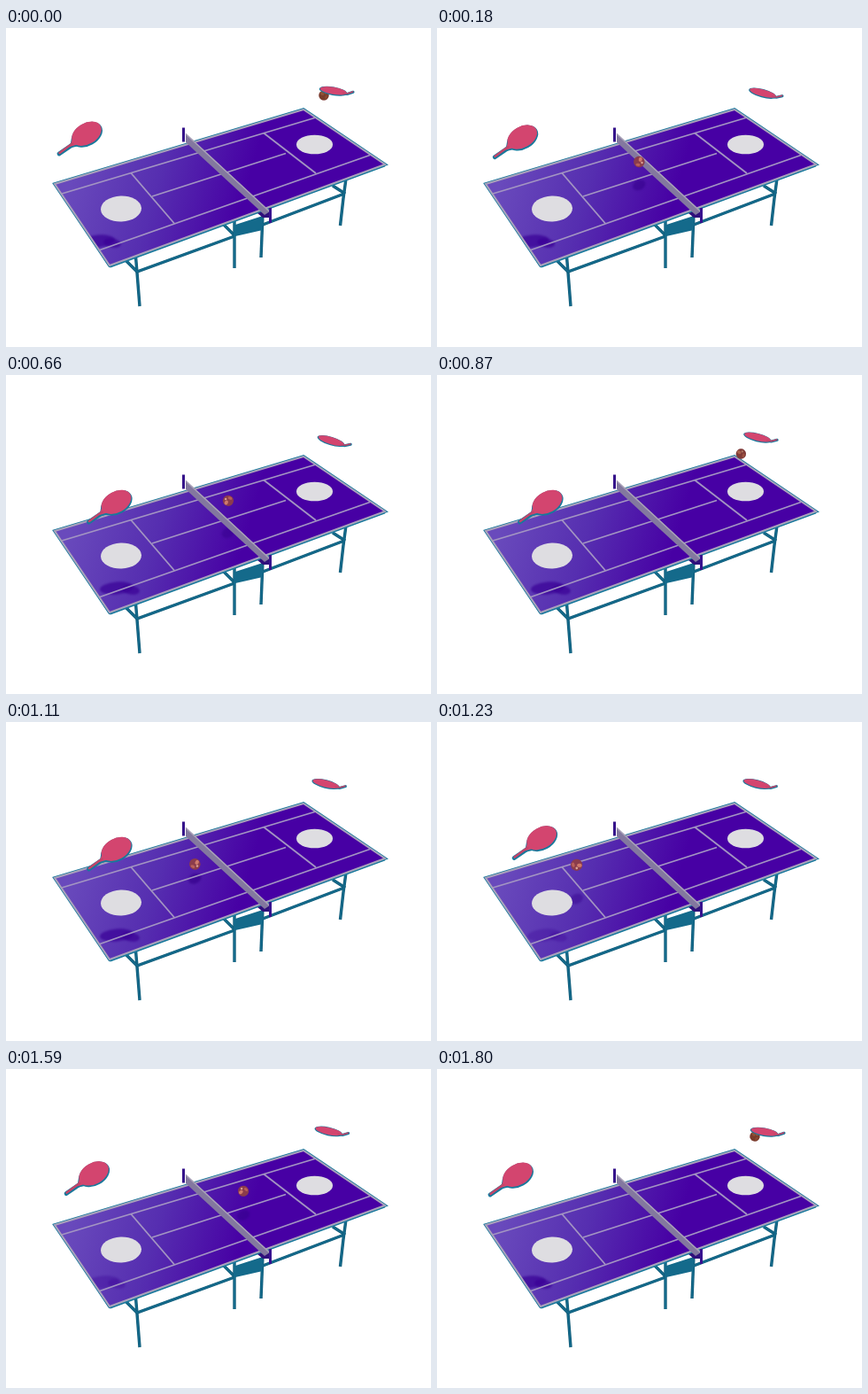
These frames come from a looping animation (480x360 px, 1830 ms). An HTML page with a canvas:

```html
<!DOCTYPE html>
<html lang="en">
<head>
<meta charset="utf-8">
<title>Table tennis rally</title>
<style>
html, body { margin: 0; width: 100%; height: 100%; overflow: hidden; background: #fff; }
canvas { display: block; width: 480px; height: 360px; }
</style>
</head>
<body>
<canvas id="stage" width="480" height="360"></canvas>
<script>
const ctx = document.getElementById('stage').getContext('2d');
const LOOP = 1830, STEP = 30, FLIGHT = 450;
const TEAL = '#146a8b', DARK_TEAL = '#115b78', RIM = '#17799c';
const PINK = '#d3456f', GRIP = '#c44468';
const TOP = [[55, 176], [336, 92], [428, 154], [117, 268]];

// where each flight starts, and where it meets the table
const HITS = [[359, 76], [120, 147], [350, 74], [114, 129]];
const BOUNCES = [[176, 197], [322, 146], [186, 187], [322, 146]];

// paddle poses: x, y, tilt
const LEFT = { ready: [91, 119.5, -30], low: [124.5, 143.5, -29], high: [110.5, 116, -30] };
const RIGHT = { swing: [369.5, 71, 8], rest: [367, 74.3, 15], high: [361, 69.8, 12] };

const lerp = (a, b, s) => a + (b - a) * s;
const mix = (a, b, s) => a.map((v, i) => lerp(v, b[i], s));
const clamp = s => Math.min(1, Math.max(0, s));
const rad = deg => deg * Math.PI / 180;

function ease(t, from, to) {
  const s = clamp((t - from) / (to - from));
  return s * s * (3 - 2 * s);
}

function leftPose(t) {
  let p = mix(LEFT.ready, LEFT.low, ease(t, 90, 450));
  p = mix(p, LEFT.high, ease(t, 1110, 1365));
  return mix(p, LEFT.ready, ease(t, 1365, 1770));
}

function rightPose(t) {
  let p = mix(RIGHT.swing, RIGHT.rest, ease(t, 0, 270));
  p = mix(p, RIGHT.high, ease(t, 660, 930));
  return mix(p, RIGHT.swing, ease(t, 1440, 1800));
}

function ballAt(t) {
  const n = Math.floor(t / FLIGHT) % 4;
  const s = t % FLIGHT / FLIGHT;
  const leftward = n % 2 === 0;
  const split = leftward ? .56 : .72;
  const [near, far] = leftward ? [52, 90] : [90, 52];
  const falling = s < split;
  const k = falling ? s / split : (s - split) / (1 - split);
  const lift = falling ? (leftward ? 14 : 5) : 3;
  const a = [...HITS[n], HITS[n][1] + near];
  const b = [...BOUNCES[n], BOUNCES[n][1]];
  const end = HITS[(n + 1) % 4];
  const c = [...end, end[1] + far];
  const [x, y, ground] = falling ? mix(a, b, k) : mix(b, c, k);
  return {
    x, ground,
    y: y - 4 * lift * k * (1 - k),
    r: lerp(6.8, 5.6, (x - 114) / 245),
    shade: clamp(1 - Math.min(s, 1 - s) * 6)
  };
}

function trace(points, close) {
  ctx.beginPath();
  points.forEach(p => ctx.lineTo(p[0], p[1]));
  if (close) ctx.closePath();
}

function poly(points, color) {
  trace(points, true);
  ctx.fillStyle = color;
  ctx.fill();
}

function line(color, width, ...points) {
  trace(points);
  ctx.strokeStyle = color;
  ctx.lineWidth = width;
  ctx.stroke();
}

function oval(x, y, rx, ry, deg, color) {
  ctx.beginPath();
  ctx.ellipse(x, y, rx, ry, rad(deg), 0, 7);
  ctx.fillStyle = color;
  ctx.fill();
}

function rod(...points) {
  line(DARK_TEAL, 3.4, ...points);
  line(TEAL, 2, ...points);
}

function frameParts() {
  rod([146.5, 258], [148, 276], [151, 314]);
  rod([135, 262], [148, 275], [258, 235]);
  rod([246, 222], [258, 234]);
  rod([258, 216], [258, 271]);
  rod([290, 210], [288, 259]);
  rod([290, 222], [382, 187]);
  rod([369, 178], [383, 187]);
  rod([384, 170], [381, 192], [377.5, 223]);
  poly([[259, 222], [290, 212], [290, 228], [259, 235]], TEAL);
}

function outline(color, width) {
  trace(TOP, true);
  ctx.strokeStyle = color;
  ctx.lineWidth = width;
  ctx.stroke();
}

function tableTop() {
  outline(RIM, 3.6);
  poly([[55, 176], [428, 154], [428, 156.5], [118, 270.5], [115, 268]], RIM);
  const shine = ctx.createLinearGradient(75, 160, 262, 214);
  shine.addColorStop(0, '#694abc');
  shine.addColorStop(.5, '#562eb0');
  shine.addColorStop(1, '#4700a4');
  poly(TOP, shine);
}

function markings() {
  const paint = (...points) => line('#a395c2', 1.8, ...points);
  paint([63, 187], [350, 101]);
  paint([106, 250.5], [411, 143.5]);
  paint([141, 163.5], [190, 220.5]);
  paint([291, 118.5], [350, 164]);
  paint([165, 190], [316, 141.5]);
  oval(130, 204, 23, 14.5, -2, '#dedde1');
  oval(348.5, 131.5, 20.5, 10.8, 0, '#dedde1');
  outline('#a9a2bb', 2);
}

function net() {
  poly([[284, 209], [299, 204], [299, 214], [290, 214]], '#30107c');
  poly([[203, 119], [298, 207], [292, 211], [203, 129]], '#83789f');
  line('#aaa3b8', 1.6, [203, 119.5], [298, 207.5]);
  line('#35128a', 3, [200.5, 112.5], [200.5, 128.5]);
  line('#38118f', 3, [298.5, 203], [298.5, 220]);
}

function shadows(ball, paddle) {
  ctx.save();
  trace(TOP, true);
  ctx.clip();
  ctx.filter = 'blur(1.2px)';
  // the paddle shadow fades as the paddle rises off its low path
  const rise = lerp(119.5, 143.5, (paddle[0] - 91) / 33.5) - paddle[1];
  const color = `rgba(58,0,150,${.7 * clamp(1 - rise / 14)})`;
  const x = lerp(104, 125, (paddle[0] - 91) / 33.5);
  oval(x, 240.5, 19, 7, -5, color);
  oval(x + 16, 242.5, 10, 5, 10, color);
  const alpha = .85 * clamp(1 - (ball.ground - ball.y) / 80);
  oval(ball.x, ball.ground, 7.5, 5.5, -25, `rgba(52,0,140,${alpha})`);
  ctx.restore();
}

function drawBall(b, t) {
  ctx.save();
  ctx.translate(b.x, b.y);
  ctx.rotate(t / 140);
  ctx.scale(b.r, b.r);
  oval(0, 0, 1, 1, 0, '#8b3c4c');
  oval(-.35, -.35, .42, .32, 30, '#cf7a6c');
  oval(.45, .35, .25, .4, 20, '#b9605a');
  oval(.3, -.45, .2, .2, 0, '#dba393');
  oval(0, 0, 1, 1, 0, `rgba(110,58,25,${b.shade * .65})`);
  ctx.restore();
}

function leftPaddle([x, y, tilt]) {
  ctx.save();
  ctx.translate(x, y);
  ctx.lineCap = 'round';
  line(RIM, 4.8, [-13, 10], [-20, 15], [-31, 22.5]);
  oval(.5, .8, 18.8, 12.7, tilt, RIM);
  poly([[-17, 4], [-6, 13], [-19, 16]], RIM);
  oval(0, -.2, 18.1, 11.9, tilt, PINK);
  poly([[-15.5, 4], [-7, 11], [-19, 14.5]], PINK);
  line(GRIP, 2.6, [-16, 11], [-21, 14.5], [-30.5, 21.5]);
  ctx.restore();
}

function rightPaddle([x, y, tilt]) {
  ctx.save();
  ctx.translate(x, y);
  ctx.rotate(rad(tilt - 10));
  ctx.lineCap = 'round';
  line(RIM, 3, [10, 3.5], [16, 4], [22.5, 2]);
  oval(0, .2, 16, 4.8, 12, RIM);
  oval(.2, -.2, 15.2, 4, 12, PINK);
  line(GRIP, 1.6, [11, 3], [16, 3.6], [22, 1.7]);
  ctx.restore();
}

function draw(t) {
  ctx.fillStyle = '#fff';
  ctx.fillRect(0, 0, 480, 360);
  const ball = ballAt(t);
  const left = leftPose(t);
  frameParts();
  tableTop();
  shadows(ball, left);
  markings();
  net();
  drawBall(ball, t);
  leftPaddle(left);
  rightPaddle(rightPose(t));
}

const start = performance.now();
function tick() {
  const t = (performance.now() - start) % LOOP;
  draw(Math.floor(t / STEP) * STEP);
  requestAnimationFrame(tick);
}
tick();
</script>
</body>
</html>
```
